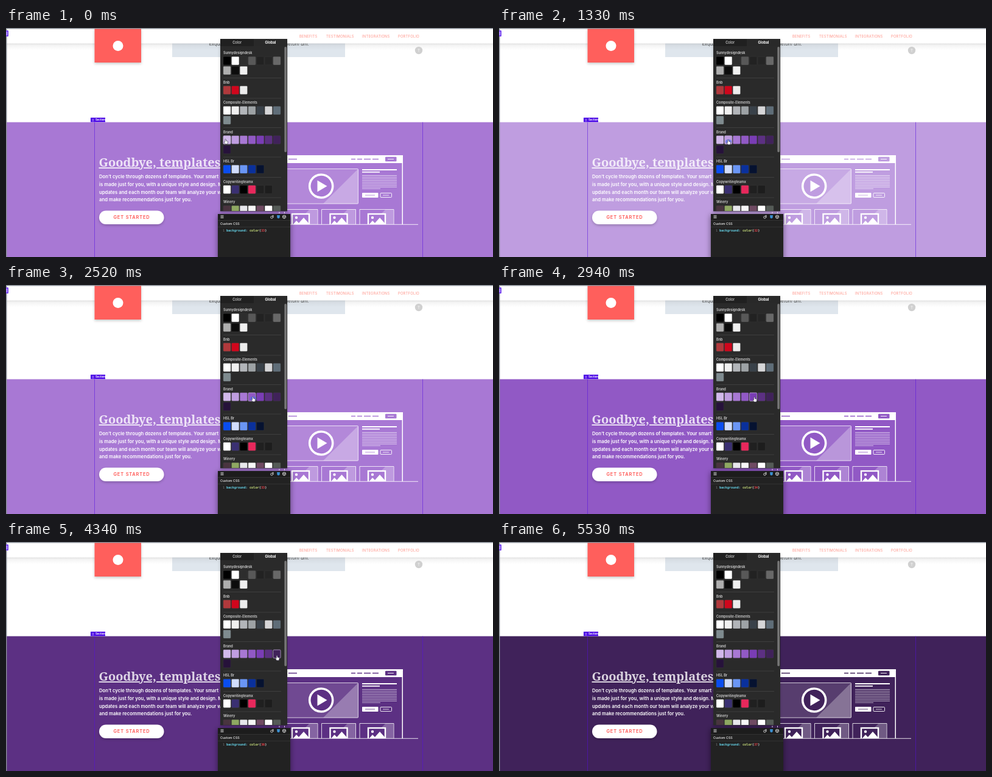
Recreate the animation shown at these times as an HTML page. Size 800 px wide and 378 px high, loop 5600 ms.

```html
<!DOCTYPE html>
<html lang="en">
<head>
<meta charset="utf-8">
<title>Global colors</title>
<style>
html, body { margin: 0; width: 100%; height: 100%; overflow: hidden; background: #fff; }
svg { display: block; width: 800px; height: 378px; font-family: Inter, sans-serif; }
.tint { fill: var(--tint); }
.nav { font-size: 5.8px; fill: #ff9489; letter-spacing: .24px; }
.title { font: bold 20px "Noto Serif", serif; fill: #fff; fill-opacity: .8; text-decoration: underline; }
.copy { font-size: 7.75px; font-weight: 600; fill: #fff; }
.label { font-size: 5.5px; font-weight: 600; fill: #d2d2d2; }
.code { font: bold 5.25px "DejaVu Sans Mono", monospace; }
</style>
</head>
<body>
<svg id="stage" viewBox="0 0 800 378" xmlns="http://www.w3.org/2000/svg">
  <defs>
    <linearGradient id="shade" x2="0" y2="1">
      <stop offset="0" stop-color="#777" stop-opacity=".22"/>
      <stop offset=".3" stop-color="#777" stop-opacity=".08"/>
      <stop offset="1" stop-color="#777" stop-opacity="0"/>
    </linearGradient>
    <filter id="soft" x="-30%" y="-40%" width="160%" height="200%">
      <feDropShadow dx="0" dy="2" stdDeviation="2" flood-color="#000" flood-opacity=".22"/>
    </filter>
    <filter id="deep" x="-30%" y="-40%" width="160%" height="180%">
      <feDropShadow dx="0" dy="2" stdDeviation="5" flood-color="#000" flood-opacity=".5"/>
    </filter>
    <clipPath id="list"><rect x="352" y="30" width="110" height="272"/></clipPath>
    <clipPath id="art"><rect x="462" y="205" width="220" height="119"/></clipPath>
  </defs>

  <!-- page top -->
  <rect width="800" height="378" fill="#fff"/>
  <rect x="273" y="22" width="284" height="26" fill="#dfe6ed"/>
  <g font-size="7.800" font-style="italic" fill="#444">
    <text x="333.500" y="29">exquisite</text>
    <text x="498" y="29" text-anchor="end">templetom am.</text>
  </g>
  <rect width="800" height="25.500" fill="#fff"/>
  <rect y="25.500" width="800" height="11" fill="url(#shade)"/>
  <rect x="145.500" y="1" width="76.500" height="56" fill="#ff5f5c" filter="url(#soft)"/>
  <circle cx="184" cy="29.500" r="8.500" fill="#fff"/>
  <g class="nav">
    <text x="482" y="16.200">BENEFITS</text>
    <text x="526" y="16.200">TESTIMONIALS</text>
    <text x="585" y="16.200">INTEGRATIONS</text>
    <text x="644" y="16.200">PORTFOLIO</text>
  </g>
  <circle cx="678" cy="37" r="6.200" fill="#d0d0d0"/>
  <path d="M678 39.500v-5m-1.500 1.500 1.500-1.500 1.500 1.500" fill="none" stroke="#f2f2f2" stroke-width=".8"/>

  <!-- colored section -->
  <rect class="tint" y="155.500" width="800" height="223"/>
  <path d="M145.500 155.500V378M684.500 155.500V378" stroke="#5510df" stroke-opacity=".55"/>
  <rect x="139" y="148" width="24" height="7.300" fill="#4b08e6"/>
  <path d="M142 150v4m1.800-4v4" stroke="#fff" stroke-width=".8" stroke-dasharray=".9 .6"/>
  <text x="147" y="153.300" font-size="4.300" font-weight="700" fill="#fff">Section</text>
  <text class="title" x="152.500" y="229">Goodbye, templates.</text>
  <g class="copy">
    <text x="153" y="248">Don’t cycle through dozens of templates. Your smart site</text>
    <text x="153" y="260.800">is made just for you, with a unique style and design. Monthly</text>
    <text x="153" y="273.600">updates and each month our team will analyze your work</text>
    <text x="153" y="286.400">and make recommendations just for you.</text>
  </g>
  <rect x="153" y="301.500" width="106.500" height="22.500" rx="11.250" fill="#fff" filter="url(#soft)"/>
  <text x="206.500" y="315.400" text-anchor="middle" font-size="7.400" font-weight="600" letter-spacing=".86" fill="#ff5552">GET STARTED</text>

  <!-- website illustration -->
  <g id="web" clip-path="url(#art)">
    <path d="M440 210H652V324H650.500V223H440Z" fill="#fff"/>
    <path d="M464 216.500h14M567 216.500h7m3 0h8m3 0h11m3 0h10" style="stroke:var(--tint)" stroke-width="1.300"/>
    <rect class="tint" x="623" y="212.800" width="18.500" height="7.400" rx="1"/>
    <path d="M627 216.500h10" stroke="#fff" stroke-width=".9"/>
    <rect x="440" y="232.500" width="138.500" height="57.500" rx="1" fill="#fff" fill-opacity=".12" stroke="#fff" stroke-opacity=".75"/>
    <path d="M578 233V290H521Z" fill="#fff" fill-opacity=".28"/>
    <circle class="tint" cx="517.700" cy="261" r="19" stroke="#fff" stroke-width="3.600"/>
    <path d="M511.500 251.500 527.500 261 511.500 270.500Z" fill="#fff"/>
    <path d="M585 234h57" stroke="#fff" stroke-width="2"/>
    <path d="M585 237.800h29" stroke="#fff" stroke-width="1.800"/>
    <rect x="585" y="272" width="26.500" height="8" rx="1" fill="#fff"/>
    <rect x="615" y="272.500" width="18.500" height="7" rx="1" fill="none" stroke="#fff" stroke-width=".9"/>
    <path d="M590 276h16" style="stroke:var(--tint)" stroke-width=".8"/>
    <path d="M619 276h10" stroke="#fff" stroke-width=".8"/>
  </g>
  <path d="M462 324.300H677" stroke="#fff" stroke-opacity=".85"/>

  <!-- color panel -->
  <rect x="352" y="18" width="110" height="284.500" fill="#292929" filter="url(#soft)"/>
  <rect x="352" y="18" width="110" height="12" fill="#202020"/>
  <rect x="407" y="18" width="55" height="12" fill="#292929"/>
  <g font-size="5.700" text-anchor="middle">
    <text x="379.500" y="26.200" fill="#ddd" font-weight="500">Color</text>
    <text x="434.500" y="26.200" fill="#fff" font-weight="700">Global</text>
  </g>
  <g id="groups" clip-path="url(#list)"></g>
  <rect x="457.300" y="31" width="3.700" height="174" rx="1.800" fill="#747474"/>

  <!-- code panel -->
  <rect x="348" y="307" width="119" height="75" fill="#242424" filter="url(#deep)"/>
  <path d="M449 303.500v2.500m8.500-2.500v2.500" stroke="#e6e0ee" stroke-width="1"/>
  <rect x="348" y="307" width="119" height="10" fill="#1c1c1c"/>
  <path d="M348 317.500h119M348 328.500h119" stroke="#3b3b3b" stroke-width=".7"/>
  <path d="M352.500 309.700h5m-5 1.900h5m-5 1.900h5" stroke="#ddd" stroke-width=".9"/>
  <g fill="none" stroke="#ddd" stroke-width=".9">
    <circle cx="436.500" cy="312.500" r="1.800"/><path d="M437 310.500l2-1.500v4"/>
    <path d="M454.500 310.300 457 309 459.500 310.300V313.200L457 314.500 454.500 313.200ZM454.500 310.300 457 311.600 459.500 310.300M457 311.600V314.500"/>
  </g>
  <path d="M445 309h5l-.5 4.500-2 1-2-1Z" fill="#3c8fd0"/>
  <text x="352" y="325.300" font-size="5.300" font-weight="500" fill="#f2f2f2">Custom CSS</text>
  <g class="code">
    <text x="356" y="335.600" fill="#777" font-weight="400">1</text>
    <text x="362" y="335.600" fill="#65d3e8">background: <tspan fill="#cbe27d">color</tspan><tspan fill="#eee">(</tspan><tspan id="num" fill="#ef4049">33</tspan><tspan fill="#eee">)</tspan></text>
  </g>

  <!-- window edges -->
  <path d="M0 .7H800M.7 0V378" stroke="#858b93" stroke-width="1.400"/>
  <rect x="0" y="4" width="4" height="10" rx="1" fill="#7440ee"/>
  <path d="M1.500 6v6" stroke="#fff" stroke-width=".8"/>

  <rect id="ring" y="178" width="12.300" height="13.700" rx="1.500" fill="none" stroke="#c8b2e0" stroke-width=".7"/>
  <g id="hand">
    <ellipse id="press" cx="0" cy="-.5" rx="5" ry="3.800" fill="#4a6cf0" fill-opacity=".65"/>
    <path d="M-1.200-3.300q.9-.9 1.500.1l.3 2.400 2.300.6q.8.3.6 1.300L2.900 4.400H-.8L-3 1.500q.2-1 1.600-.2Z" fill="#fff" stroke="#2b2440" stroke-width=".6"/>
  </g>
</svg>
<script>
const LOOP = 5600;
const $ = id => document.getElementById(id);
const brand = ['#d2b9eb', '#bf9de0', '#a878d4', '#9159c5', '#7a3db5', '#5c3083', '#40225a'];

function add(parent, tag, attrs, text) {
  const el = document.createElementNS('http://www.w3.org/2000/svg', tag);
  for (const key in attrs) el.setAttribute(key, attrs[key]);
  if (text) el.textContent = text;
  parent.append(el);
}

// name, label center, colors; rows wrap after seven
const groups = [
  ['Sunnydesigndesk', 41, '#000 #fff #2d2d2d #585858 #222 #252525 #686868 #aeaeae #0c0c0c #f0f0f0'],
  ['Bnb', 89.5, '#b0393c #d0061c #ececec'],
  ['Composite-Elements', 123, '#fff #f0f0f0 #b2b5b9 #9da2a5 #394149 #d6d6d8 #5f6d78 #7f8b8f'],
  ['Brand', 171.5, brand.join(' ') + ' #26123a'],
  ['HSL Br', 220, '#0a4df0 #d1ddfc #6a96f5 #0a309c #061230'],
  ['Copywritingteamx', 253.5, '#fff #3a3072 #000 #e8285c #202020 #1d1d1d'],
  ['Winery', 287, '#49343f #8fa862 #e8e8ec #f8f8f8 #6f4a62 #fff #555b57']
];
const slotX = i => 356.9 + 13.65 * (i % 7);

groups.forEach(([name, y, colors], g) => {
  const box = $('groups');
  if (g) add(box, 'path', { d: `M357 ${y - 7}H452`, stroke: '#474747', 'stroke-width': .7 });
  add(box, 'text', { class: 'label', x: 357, y: y + 2 }, name);
  colors.split(' ').forEach((fill, i) => add(box, 'rect', {
    x: slotX(i), y: y + 6.2 + 16 * Math.floor(i / 7), width: 12.3, height: 13.7, rx: 1.3,
    fill, stroke: '#444', 'stroke-width': .3
  }));
});

const web = $('web');
for (let y = 243.5; y < 267; y += 2.7)
  add(web, 'path', { d: `M585 ${y}h${y > 264 ? 30 : 57}`, stroke: '#fff', 'stroke-opacity': .8, 'stroke-width': .8 });
for (const x of [484, 546.5, 609]) {
  add(web, 'path', { d: `M${x - 28} 326V299.500h56V326`, fill: 'none', stroke: '#fff', 'stroke-opacity': .8 });
  add(web, 'path', { d: `M${x + 27.5} 300V326H${x - 12}L${x + 14} 300Z`, fill: '#fff', 'fill-opacity': .25 });
  add(web, 'rect', { class: 'tint', x: x - 14, y: 307, width: 28, height: 22, stroke: '#fff', 'stroke-width': 2.4 });
  add(web, 'circle', { cx: x - 7, cy: 313, r: 2.2, fill: '#fff' });
  add(web, 'path', { d: `M${x - 13} 325l6-7 4 4 8-9 8 9v4Z`, fill: '#fff' });
}

// pointer stops: arrive, leave, x, y
const stops = [
  [0, 780, 361, 187], [980, 1500, 377, 188], [1680, 2150, 392, 188],
  [2330, 2680, 406, 188], [2850, 3400, 420, 188.5], [3600, 4050, 437, 190], [4230, 5100, 445.5, 191]
];
// moment each brand color is applied
const clicks = [450, 1260, 1890, 2590, 3200, 3920, 4620];

function pointer(t) {
  let i = stops.length - 1;
  while (i && t < stops[i][0]) i--;
  const [, leave, x, y] = stops[i], next = stops[i + 1];
  if (!next || t <= leave) return [x, y];
  const p = (t - leave) / (next[0] - leave), e = p * p * (3 - 2 * p);
  return [x + (next[2] - x) * e, y + (next[3] - y) * e];
}

function draw(t) {
  let pick = 2;
  clicks.forEach((at, i) => { if (t >= at) pick = i; });
  $('stage').style.setProperty('--tint', brand[pick]);
  $('num').textContent = 31 + pick;

  const [x, y] = pointer(t), shown = t < 5100;
  $('hand').setAttribute('transform', `translate(${x} ${y})`);
  $('hand').style.display = $('ring').style.display = shown ? '' : 'none';
  $('ring').setAttribute('x', slotX(Math.min(6, Math.floor((x - 356.5) / 13.65))));
  $('press').style.display = clicks.some(at => Math.abs(t - at) < 85) ? '' : 'none';
}

const start = performance.now();
function tick() {
  draw((performance.now() - start) % LOOP);
  requestAnimationFrame(tick);
}
tick();
</script>
</body>
</html>
```
